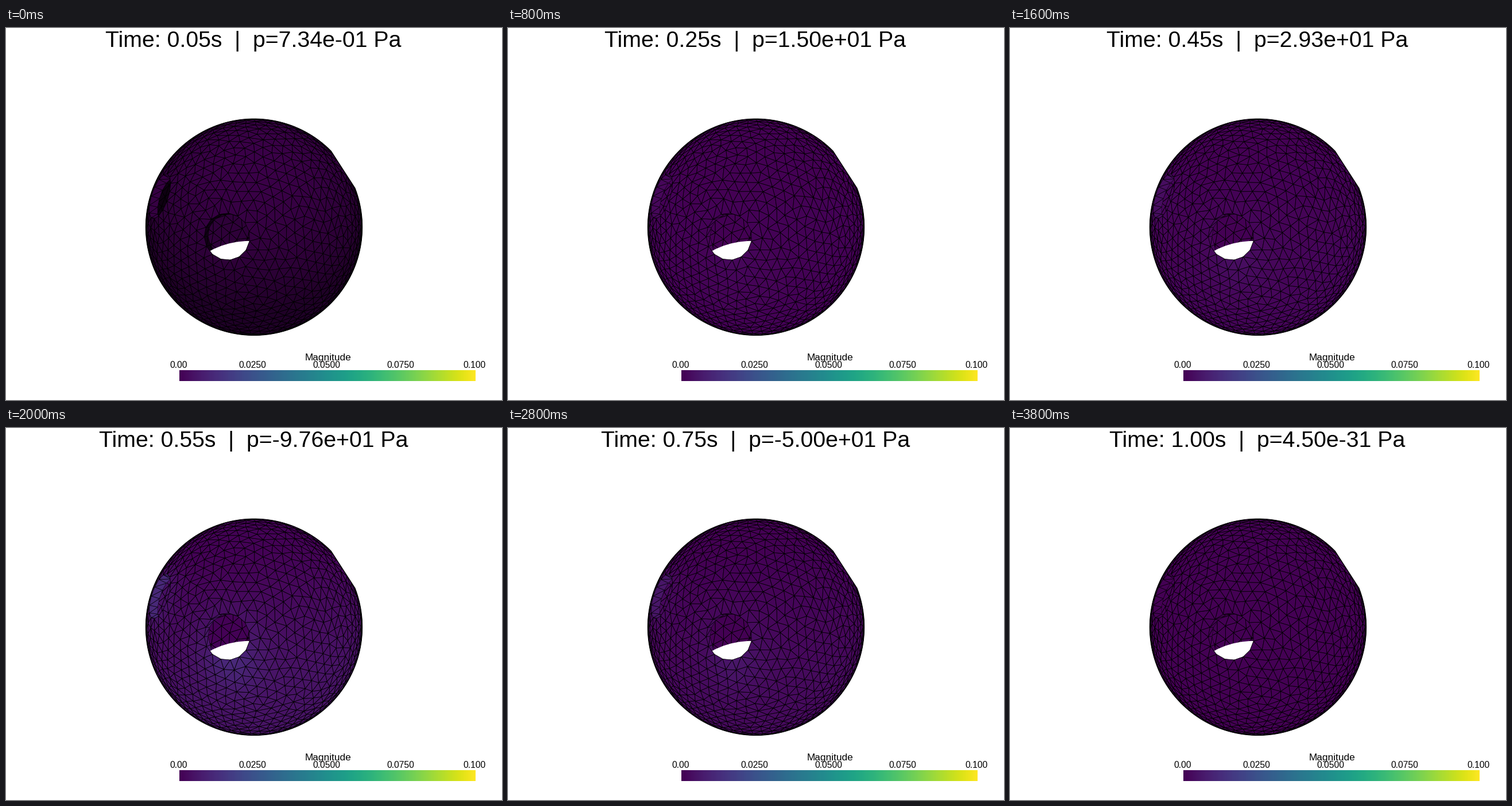
A matplotlib script that plays this animation: 864 by 648 pixels, repeating every 4 s.

```python
import numpy as np
import matplotlib.pyplot as plt
from matplotlib.animation import FuncAnimation
from matplotlib.collections import LineCollection, PolyCollection
from matplotlib.patches import Circle, Polygon
from matplotlib.tri import Triangulation

W, H, DPI = 864, 648, 100
PX = 72 / DPI
FRAMES, STEP = 20, 200
CX, CY, R = 432, 346.8, 188.7
CORE = 0.92      # inner radius of the shell
HOLE_COS = 0.976
RING = 15
FONT = "Liberation Sans"
viridis = plt.get_cmap("viridis")


def unit(v):
    return v / np.linalg.norm(v, axis=-1, keepdims=True)


def axis(x, y):
    return unit(np.array([x, y, np.sqrt(max(0, 1 - x * x - y * y))]))


FRONT, SIDE, EDGE = axis(-0.255, -0.09), axis(-0.89, 0.291), axis(0.84, 0.5426)
HOLES = (FRONT, SIDE, EDGE)


def to_px(p):
    return np.stack([CX + R * p[..., 0], CY - R * p[..., 1]], axis=-1)


def ring(a):
    """Points around the mouth of the opening with axis a."""
    u = unit(np.cross(a, [0.0, 0.0, 1.0]))
    v = np.cross(a, u)
    t = np.linspace(0, 2 * np.pi, RING, endpoint=False)[:, None]
    return HOLE_COS * a + np.sqrt(1 - HOLE_COS ** 2) * (np.cos(t) * u + np.sin(t) * v)


def build_mesh(n=1300, rounds=45):
    """Evenly spread points on the sphere, triangulated on its near side."""
    rng = np.random.default_rng(7)
    fixed = np.vstack([ring(a) for a in HOLES])
    k = len(fixed)
    pts = np.vstack([fixed, unit(rng.normal(size=(n - k, 3)))])
    gap2 = 4 * np.pi / n
    for i in range(rounds):
        d2 = np.clip(2 - 2 * pts @ pts.T, 0.03 * gap2, None)
        w = (gap2 / d2) ** 2
        np.fill_diagonal(w, 0)
        push = w.sum(1, keepdims=True) * pts - w @ pts
        size = np.linalg.norm(push, axis=1, keepdims=True)
        limit = np.sqrt(gap2) * (0.25 - 0.2 * i / rounds)
        push *= np.minimum(0.25, limit / np.maximum(size, 1e-9))
        pts[k:] = unit(pts[k:] + push[k:])

    # Delaunay in the stereographic plane is Delaunay on the sphere
    near = pts[pts[:, 2] > -0.5]
    flat = near[:, :2] / (1 + near[:, 2:])
    tris = near[Triangulation(flat[:, 0], flat[:, 1]).triangles]
    a, b, c = tris[:, 0], tris[:, 1], tris[:, 2]
    normal = np.cross(b - a, c - a)
    normal *= np.sign((normal * tris.mean(1)).sum(1, keepdims=True))
    return tris[normal[:, 2] > 0]


tris = build_mesh()
mid = unit(tris.mean(1))
solid = np.all([mid @ a < HOLE_COS for a in HOLES], axis=0)
skin_mid = mid[solid]


def bump(a, width):
    return np.exp(-(2 - 2 * skin_mid @ a) / width ** 2)


# Displacement at full suction, and the shading of the lit first picture
mag = (0.005 * np.clip(0.6 - 0.7 * skin_mid[:, 1] + 0.15 * skin_mid[:, 0], 0.08, 1)
       + 0.0055 * bump(axis(-0.2, -0.34), 0.27)
       + 0.003 * bump(FRONT, 0.3)
       + 0.006 * bump(SIDE, 0.28))
lit = 0.46 + 0.4 * np.clip(skin_mid @ [0, 0.62, 0.78], 0, 1)

fig = plt.figure(figsize=(W / DPI, H / DPI), dpi=DPI, facecolor="white")
ax = fig.add_axes([0, 0, 1, 1])
ax.axis("off")


def shape(pts, z, lw=0):
    return ax.add_patch(Polygon(pts, closed=True, ec="black", lw=lw * PX, zorder=z))


def net(polys, z):
    return ax.add_collection(PolyCollection(polys, edgecolors="black",
                                            linewidths=0.8 * PX, zorder=z))


def opening(a):
    """Wall of the shell and the far inside seen past it."""
    outer, inner = to_px(ring(a)), to_px(CORE * ring(a))
    wall = shape(outer, 2)
    hollow = shape(inner, 3, 0.9)
    back = net(to_px(tris) * [-1, 1] + [2 * CX, 0], 4)
    back.set_clip_path(hollow)
    for shift in (0, 1):
        ends = np.roll(inner, shift, axis=0)
        ax.add_collection(LineCollection(np.stack([outer, ends], axis=1),
                                         colors="black", linewidths=0.8 * PX, zorder=2.5))
    return wall, hollow, back


# Outline: a circle cut straight across by the opening on its edge
half = np.arccos(HOLE_COS + 0.003)
tilt = np.arctan2(EDGE[1], EDGE[0])
arc = np.linspace(tilt + half, tilt + 2 * np.pi - half, 160)
body = shape(to_px(np.column_stack([np.cos(arc), np.sin(arc)])), 1, 1)

front, side = opening(FRONT), opening(SIDE)
daylight = ax.add_patch(Circle((424, 516), 145, fc="white", lw=0, zorder=4.5))
daylight.set_clip_path(front[0])
skin = net(to_px(tris[solid]), 5)
skin.set_clip_path(body)

ax.imshow(np.linspace(0, 1, 256)[None], cmap=viridis, aspect="auto",
          extent=(302, 818, 615, 596), interpolation="nearest", zorder=2)


def label(x, y, text, px):
    return ax.text(x, y, text, fontsize=px * PX, family=FONT, color="black",
                   ha="center", va="baseline", zorder=9)


label(561.5, 579, "Magnitude", 17.3)
for k in range(5):
    label(301 + 128.8 * k, 591.5, f"{0.025 * k:#.3g}", 15.6)
title = label(431, 33, "", 39.3)
ax.set(xlim=(0, W), ylim=(H, 0))


def tint(m, shade):
    rgba = viridis(np.atleast_1d(m) / 0.1)
    rgba[:, :3] *= np.reshape(shade, (-1, 1))
    return rgba


def update(i):
    t = (i + 1) / FRAMES
    p = (30 if t % 1 <= 0.5 else -100) * np.sin(np.pi * t) ** 2
    title.set_text(f"Time: {t:.2f}s  |  p={p:.2e} Pa")
    load = abs(p) / 97.6

    def paint(part, m, shade):
        part.set_facecolor(tint(m * load, shade if i == 0 else 1))

    paint(skin, mag, lit)
    paint(body, 0.004, 0.46)
    for (wall, hollow, back), wall_mag, wall_lit, in_mag, in_lit in (
            (front, 0.006, 0.25, 0.0006, 0.68), (side, 0.011, 0.8, 0.004, 0.2)):
        paint(wall, wall_mag, wall_lit)
        paint(hollow, in_mag, in_lit)
        paint(back, in_mag, in_lit)
    return ()


anim = FuncAnimation(fig, update, frames=FRAMES, interval=STEP, repeat=True,
                     repeat_delay=0, blit=False)
plt.show()
```
